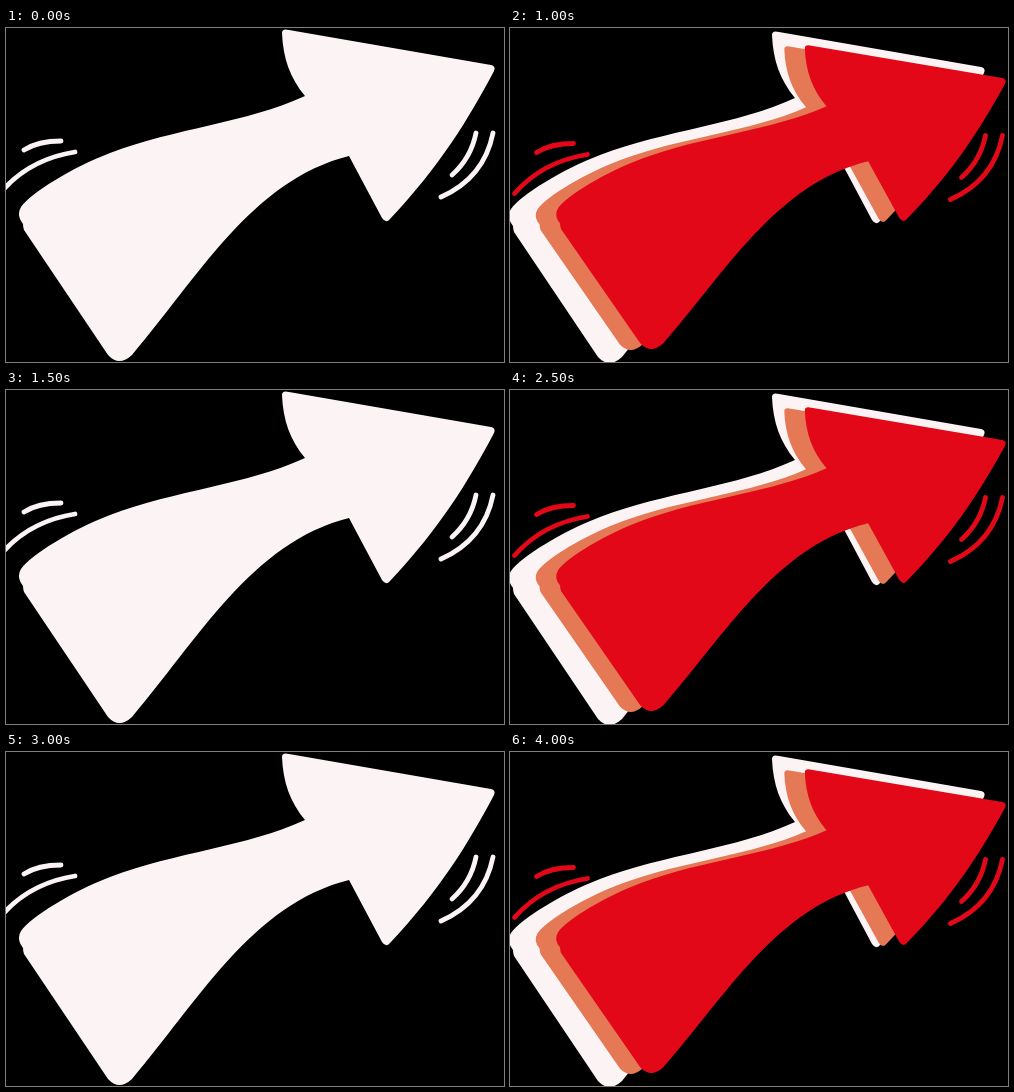
An HTML page for the animation above (4500 ms loop, 498x334 px).

```html
<!DOCTYPE html>
<html lang="en">
<head>
<meta charset="utf-8">
<title>Arrow</title>
<style>
  html, body { margin: 0; width: 100%; height: 100%; overflow: hidden; background: #000; }
  svg { display: block; width: 498px; height: 334px; }
  .marks { fill: none; stroke-width: 4.8; stroke-linecap: round; }
</style>
</head>
<body>
<svg viewBox="0 0 498 334">
  <defs>
    <path id="arrow" d="M283 2 L485 37 Q490 38 488 43 C462 92 434 138 384 191
      Q380 196 376 190 L343 128 C246 152 191 251 126 327 Q113 339 102 327
      L18 202 Q17 199 17 196 Q10 187 15 179 C25 165 65 140 104 125
      C170 100 240 95 299 68 C284 50 277 30 276 5 Q276 0 283 2Z"/>
    <path id="left" d="M18 122 Q32 113 55 113 M-4 163 Q24 131 69 124"/>
    <path id="right" d="M470 105 Q465 130 446 147 M487 105 Q478 150 435 169"/>
  </defs>
  <g id="scene"></g>
</svg>
<script>
  const WHITE = '#fbf3f4', ORANGE = '#e57855', RED = '#e20818';
  const STEP = 500;

  const arrow = (color, x, y, sx = 1, sy = 1) =>
    `<use href="#arrow" fill="${color}" transform="translate(${x} ${y}) scale(${sx} ${sy})"/>`;
  const smallArrow = (color, x, y) => arrow(color, x, y, 0.945, 0.916);
  const marks = (color, leftX, rightX, y) =>
    `<g class="marks" stroke="${color}">
      <use href="#left" x="${leftX}" y="${y}"/><use href="#right" x="${rightX}" y="${y}"/>
    </g>`;

  // Each pose adds one more coloured layer.
  const poses = [
    arrow(WHITE, 0, 0) + marks(WHITE, 0, 0, 0),
    arrow(WHITE, -7, -1) + smallArrow(ORANGE, 36, 14) + marks(ORANGE, 4, 6, 1),
    arrow(WHITE, -14, 2) + smallArrow(ORANGE, 13.5, 17) + smallArrow(RED, 34, 16) +
      marks(RED, 8.5, 5.5, 2.5)
  ];

  const scene = document.getElementById('scene');
  let shown = -1;

  function draw() {
    const pose = Math.floor(performance.now() / STEP) % poses.length;
    if (pose !== shown) scene.innerHTML = poses[shown = pose];
    requestAnimationFrame(draw);
  }
  draw();
</script>
</body>
</html>
```
